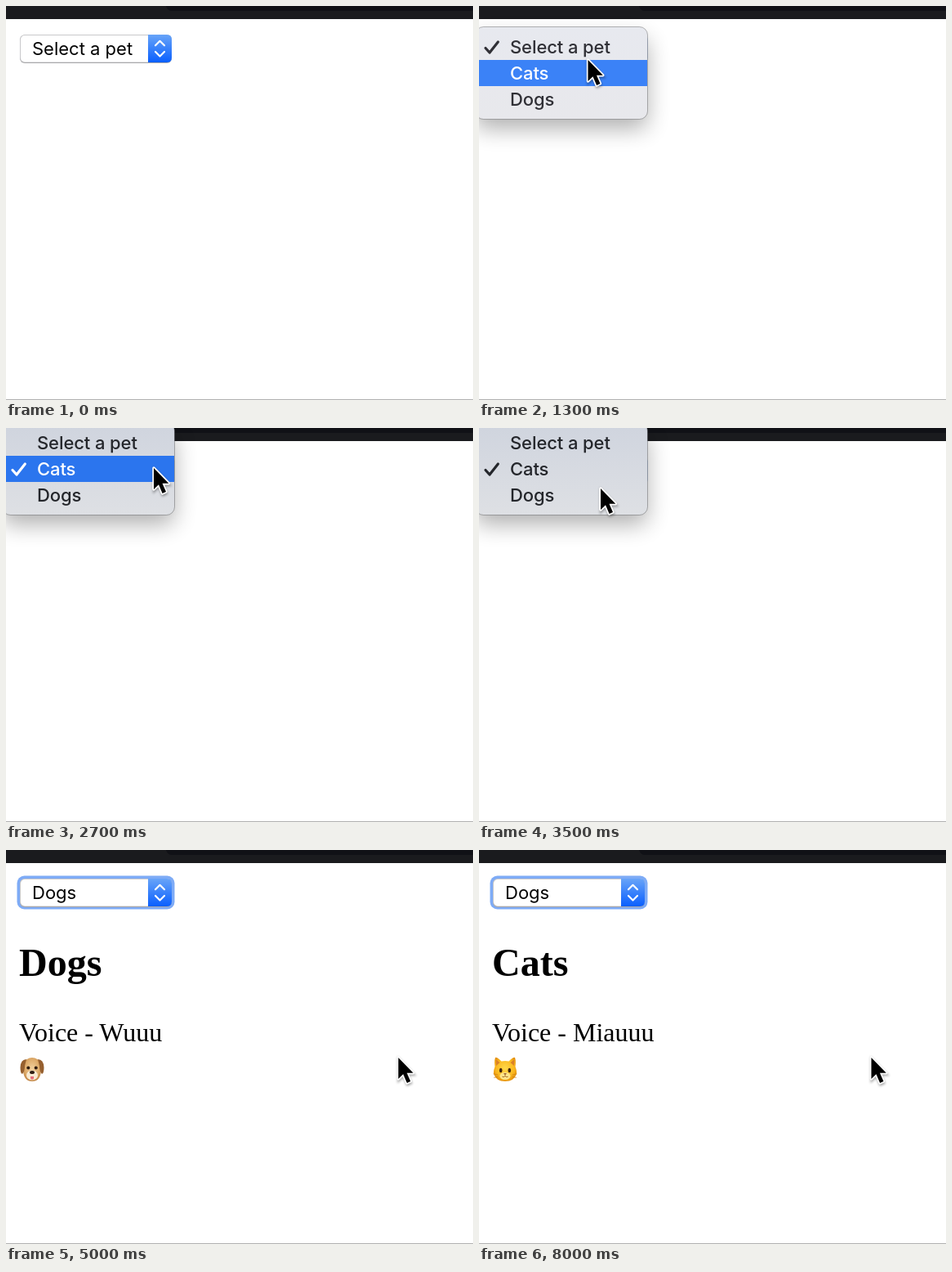
Recreate the animation shown at these times as an HTML page. Size 572 by 482 pixels, loop 8600 ms.

```html
<!DOCTYPE html>
<html lang="en">
<head>
<meta charset="utf-8">
<title>Pet select</title>
<style>
  html, body { margin: 0; width: 100%; height: 100%; overflow: hidden; background: #fff; }
  svg { display: block; width: 572px; height: 482px; }
  .ui { font: 400 22px Inter, Roboto, sans-serif; }
  .item { font-weight: 500; letter-spacing: -0.1px; }
  .page { font: 32px "Liberation Serif", "Times New Roman", serif; }
  .title { font-size: 48px; font-weight: 700; }
  .line { fill: none; stroke-linecap: round; stroke-linejoin: round; }
</style>
</head>
<body>
<svg viewBox="0 0 572 482" xmlns="http://www.w3.org/2000/svg">
  <defs>
    <linearGradient id="blue" x2="0" y2="1">
      <stop stop-color="#68a4f8"/><stop offset="1" stop-color="#0a5ffe"/>
    </linearGradient>
    <linearGradient id="cool" x2="0" y2="1">
      <stop stop-color="#cfd4de"/><stop offset="1" stop-color="#dee0e4"/>
    </linearGradient>
    <linearGradient id="light" x2="0" y2="1">
      <stop stop-color="#e7e9ef"/><stop offset="1" stop-color="#e8e8ec"/>
    </linearGradient>
    <radialGradient id="catFur" cx=".5" cy=".45" r=".6">
      <stop stop-color="#ffd84a"/><stop offset=".65" stop-color="#fbb91f"/><stop offset="1" stop-color="#e08a0c"/>
    </radialGradient>
    <radialGradient id="dogFur" cx=".5" cy=".45" r=".6">
      <stop stop-color="#f0cf9c"/><stop offset=".7" stop-color="#dba765"/><stop offset="1" stop-color="#b87a3c"/>
    </radialGradient>
    <filter id="menuShadow" x="-30%" y="-30%" width="160%" height="190%">
      <feGaussianBlur stdDeviation="14"/>
    </filter>
    <filter id="soft" x="-40%" y="-40%" width="180%" height="180%">
      <feGaussianBlur stdDeviation="1.4"/>
    </filter>
  </defs>

  <rect width="572" height="482" fill="#fff"/>
  <rect width="572" height="16" fill="#1a1b1e"/>
  <path d="M196 0H572V6H203Q198 6 196 0Z" fill="#101116"/>
  <rect y="481" width="572" height="1" fill="#b1b1b1"/>

  <g id="select">
    <rect id="ring" x="13.5" y="31.5" width="193" height="41" rx="9" fill="#7eabf6"/>
    <rect x="17" y="35.5" width="186" height="34.5" rx="6" fill="#a9a9ab"/>
    <rect x="17" y="35" width="186" height="34" rx="6" fill="#c9c9cb"/>
    <rect x="18" y="36" width="184" height="32.5" rx="5" fill="#fff"/>
    <path d="M174 35H197Q203 35 203 41V63Q203 69 197 69H174Z" fill="url(#blue)"/>
    <path class="line" d="M183 48.3L188.5 42.8L194 48.3M183 56L188.5 61.5L194 56" stroke="#fff" stroke-width="2.2"/>
    <text id="value" class="ui" x="32" y="60"></text>
  </g>

  <text id="loading" class="page" x="16" y="98">Loading...</text>
  <g id="result">
    <text id="title" class="page title" x="16" y="154"></text>
    <text id="voice" class="page" x="16" y="234"></text>
    <g id="cat">
      <path d="M20 254Q22 253 27.5 258.5Q32 257.5 36.5 258.5Q42 253 44 254Q45.5 258 44.5 265Q46.5 270 46 274Q43 283 32 283Q21 283 18 274Q17.5 270 19.5 265Q18.5 258 20 254Z" fill="url(#catFur)"/>
      <path d="M21 256.5L25.5 260L21 264ZM43 256.5L38.5 260L43 264Z" fill="#d9802a"/>
      <ellipse cx="32" cy="276.5" rx="6.5" ry="4.5" fill="#ffe58a"/>
      <ellipse cx="26.7" cy="269.5" rx="1.8" ry="2.8" fill="#40230e"/>
      <ellipse cx="37.3" cy="269.5" rx="1.8" ry="2.8" fill="#40230e"/>
      <path d="M30 273.2H34L32 275.4Z" fill="#8c4a1f"/>
      <path class="line" d="M28.8 277.5Q31 278.8 32 276Q33 278.8 35.2 277.5" stroke="#9a5a1c" stroke-width=".9"/>
      <path class="line" d="M23 275L18 274M23 277.5L18.5 278.5M41 275L46 274M41 277.5L45.5 278.5" stroke="#c77a16" stroke-width=".6"/>
    </g>
    <g id="dog">
      <path d="M24 257Q32 251 40 257Q44 262 43 270Q42 283 32 283Q22 283 21 270Q20 262 24 257Z" fill="url(#dogFur)"/>
      <path d="M25 256Q18 256 17.5 266Q17.5 273 20 274Q23 271 23 264ZM39 256Q46 256 46.5 266Q46.5 273 44 274Q41 271 41 264Z" fill="#96602f"/>
      <ellipse cx="32" cy="275.5" rx="7" ry="6" fill="#f8ead2"/>
      <circle cx="27.3" cy="266.5" r="2" fill="#2f1c10"/>
      <circle cx="36.7" cy="266.5" r="2" fill="#2f1c10"/>
      <ellipse cx="32" cy="272" rx="3" ry="2" fill="#2f1c10"/>
      <path d="M30 277H34V279.5Q32 282 30 279.5Z" fill="#e9707c"/>
    </g>
  </g>

  <g id="menu">
    <rect x="-5" y="40" width="211" height="110" rx="10" fill="#000" opacity=".31" filter="url(#menuShadow)"/>
    <rect id="panel" x="-4.5" y="25.5" width="211" height="113" rx="10" stroke="#000" stroke-opacity=".27"/>
    <rect id="bar" width="206" height="32"/>
    <path id="check" class="line" d="M8 51.5L13 57L23.3 44" stroke-width="3.2"/>
    <g id="items" class="ui item">
      <text x="38" y="58">Select a pet</text>
      <text x="38" y="90">Cats</text>
      <text x="38" y="122">Dogs</text>
    </g>
  </g>

  <g id="cursor">
    <path d="M0 0V26L6 20.3L10.6 31L15 29L10.5 18.8H18.3Z" fill="#000" stroke="#000" stroke-width="3" opacity=".35" transform="translate(.5 2)" filter="url(#soft)"/>
    <path d="M0 0V26L6 20.3L10.6 31L15 29L10.5 18.8H18.3Z" fill="#000" stroke="#fff" stroke-width="3.4" stroke-linejoin="round" paint-order="stroke"/>
  </g>
</svg>
<script>
const LOOP = 8600, STEP = 100, ROW = 32;
const el = id => document.getElementById(id);
const show = (id, on) => el(id).setAttribute("visibility", on ? "visible" : "hidden");
const set = (id, attrs) => { for (const k in attrs) el(id).setAttribute(k, attrs[k]); };
const names = ["Select a pet", "Cats", "Dogs"];
const items = [...el("items").children];

// Cursor path: time, x, y
const path = [
  [500, 190, 120], [700, 166, 70], [900, 156, 56], [1000, 154, 54],
  [1100, 147, 54], [1300, 133.5, 66], [1500, 134.5, 69], [1600, 134.5, 69],
  [1800, 146, 65], [2000, 164, 61], [2200, 188, 52], [2400, 188, 52],
  [2700, 181, 49], [3000, 155, 70], [3200, 148, 74], [3300, 149, 74],
  [3500, 149, 74], [3600, 153, 76], [3700, 235, 120], [3800, 385, 202],
  [3900, 462, 244], [4000, 480.5, 254]
];

// Each opening of the list: visible span, vertical shift, checked row, fill colours
const openings = [
  { from: 1000, to: 2000, blink: 1700, shift: 0, checked: 0, fill: "url(#light)", bar: "#3b82f7", ink: "#303036" },
  { from: 2400, to: 3700, blink: 3500, shift: -ROW, checked: 1, fill: "url(#cool)", bar: "#2b75ee", ink: "#24262b" }
];

function cursorAt(t) {
  const i = path.findIndex(p => p[0] > t);
  if (i < 0) return path[path.length - 1].slice(1);
  if (i === 0) return path[0].slice(1);
  const [t0, x0, y0] = path[i - 1], [t1, x1, y1] = path[i];
  const k = (t - t0) / (t1 - t0);
  return [x0 + (x1 - x0) * k, y0 + (y1 - y0) * k];
}

function drawMenu(t, y) {
  const m = openings.find(o => t >= o.from && t < o.to);
  show("menu", m);
  show("bar", false);
  if (!m) return;
  const hover = Math.max(0, Math.min(2, Math.floor((y - 34 - m.shift) / ROW)));
  const active = t >= m.blink && t < m.blink + STEP ? -1 : hover;
  const ink = row => row === active ? "#fff" : m.ink;
  set("menu", { transform: `translate(0 ${m.shift})`, opacity: t >= m.to - STEP ? 0.35 : 1 });
  set("panel", { fill: m.fill });
  set("bar", { y: 34 + Math.max(0, active) * ROW, fill: m.bar });
  show("bar", active >= 0);
  set("check", { transform: `translate(0 ${m.checked * ROW})`, stroke: ink(m.checked) });
  items.forEach((item, row) => item.setAttribute("fill", ink(row)));
}

function draw(time) {
  const t = Math.floor((time % LOOP) / STEP) * STEP;
  const [x, y] = cursorAt(t);
  show("cursor", t >= 500);
  set("cursor", { transform: `translate(${x} ${y})` });

  show("ring", t >= 900);
  el("value").textContent = names[t < 2100 ? 0 : t < 3800 ? 1 : 2];
  show("loading", t >= 2100 && t < 4300);

  const dogs = t < 5600;
  show("result", t >= 4300);
  show("cat", t >= 4300 && !dogs);
  show("dog", t >= 4300 && dogs);
  el("title").textContent = dogs ? "Dogs" : "Cats";
  el("voice").textContent = dogs ? "Voice - Wuuu" : "Voice - Miauuu";

  drawMenu(t, y);
}

function tick(now) {
  draw(now);
  requestAnimationFrame(tick);
}
draw(0);
requestAnimationFrame(tick);
</script>
</body>
</html>
```
